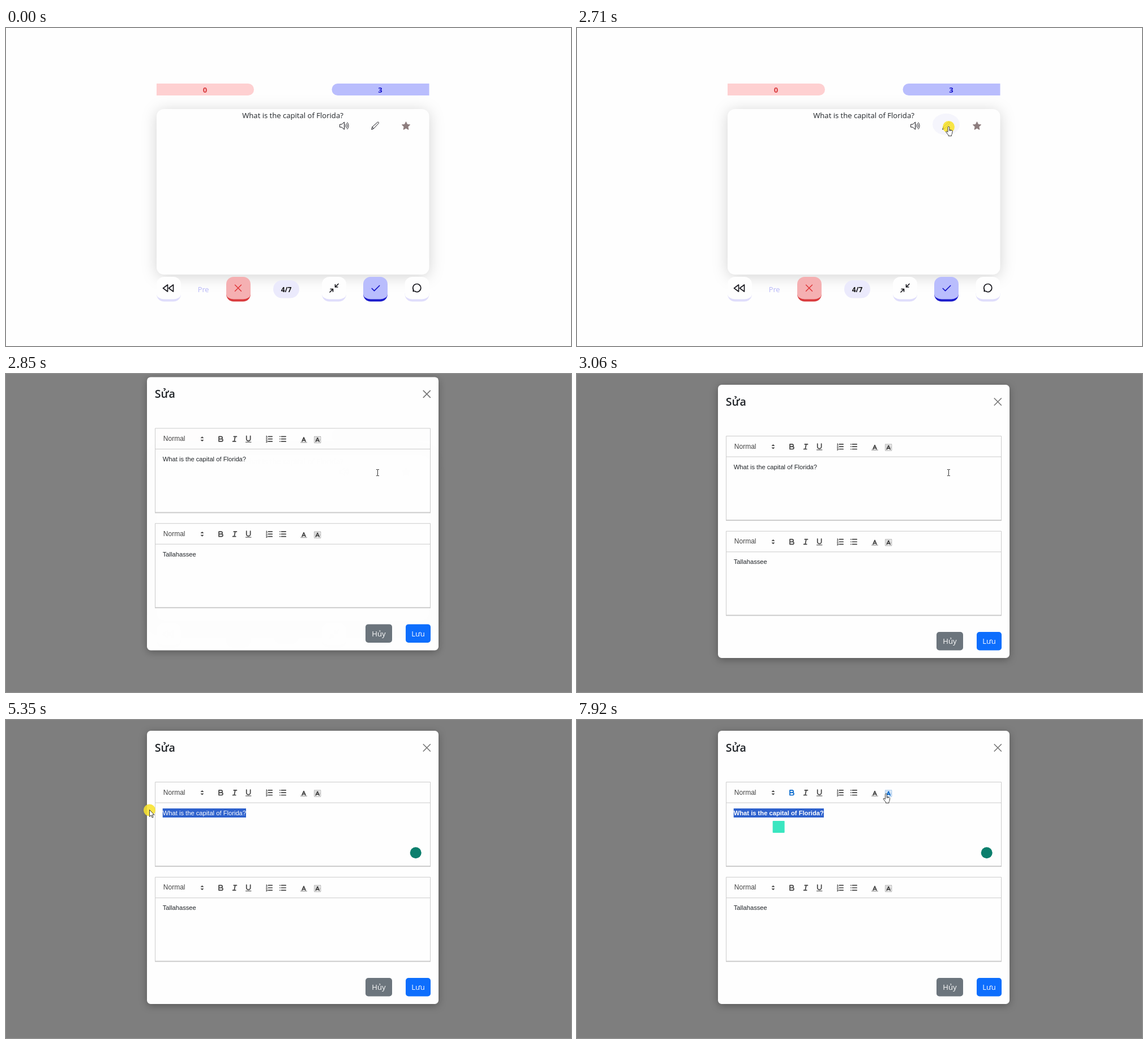
Animation of 998x561 px, one loop 7.99 s. Source, as an HTML page:

```html
<!DOCTYPE html>
<html lang="vi">
<head>
<meta charset="utf-8">
<title>Flashcard editor</title>
<style>
  html, body { margin: 0; width: 100%; height: 100%; overflow: hidden; background: #fefefe; }
  #stage { display: block; width: 998px; height: 561px; }
  text { font-family: "Open Sans", "Noto Sans", sans-serif; font-size: 13.1px; fill: #212529; }
  .mid { text-anchor: middle; }
  .bold { font-weight: 700; }
  .line { fill: none; stroke: #1c1c22; stroke-width: 1.7; stroke-linecap: round; stroke-linejoin: round; }
  .card { fill: #fefefe; filter: drop-shadow(0 3px 13px rgba(0, 0, 0, .17)); }
  .sheet { fill: #fefefe; filter: drop-shadow(0 3px 7px rgba(0, 0, 0, .3)); }
  .frame { fill: none; stroke: #ccc; }
  .editor text { font-family: "Liberation Sans", Arial, sans-serif; font-size: 11.2px; }
  .editor .pick { font-size: 12px; fill: #444; }
  .tool { color: #444; fill: none; stroke: currentColor; stroke-width: 2; stroke-linecap: round; stroke-linejoin: round; }
  .tool .solid { fill: currentColor; stroke: none; }
  .pointer { fill: #fff; stroke: #222; stroke-width: .9; stroke-linejoin: round; }
</style>
</head>
<body>
<svg id="stage" viewBox="0 0 998 561" xmlns="http://www.w3.org/2000/svg">
  <rect width="998" height="561" fill="#fefefe"/>

  <g id="page">
    <path d="M266 98h161.500a10.500 10.500 0 0 1 0 21H266z" fill="#fed0d1"/>
    <path d="M747.500 98H586a10.500 10.500 0 0 0 0 21h161.500z" fill="#b9bdfd"/>
    <text class="mid bold" x="351.500" y="114" style="fill:#d93a3d">0</text>
    <text class="mid bold" x="661" y="114" style="fill:#1414c8">3</text>

    <rect class="card" x="266" y="143" width="481.500" height="292" rx="13"/>
    <ellipse id="halo" cx="652" cy="170" rx="24" ry="19" fill="#f5f5fc"/>
    <text class="mid" x="506.500" y="158.700">What is the capital of Florida?</text>

    <g class="line" style="stroke-width:1">
      <path d="M590 170h3l4.500-4v13l-4.500-4h-3zM599.500 170.500q1.400 2 0 4M601.200 168.500q3 4 0 8M603 166.700q4.400 5.800 0 11.600"/>
      <path d="M645.800 178.700l1.200-4.200 9.300-8.300q1-.7 1.800.2.800.9 0 1.800l-8.700 9.200zM647 174.500l2.400 2.900"/>
    </g>
    <path d="M706.500 165.500l2.100 4.600 5 .6-3.700 3.500 1 5-4.400-2.500-4.400 2.500 1-5-3.700-3.500 5-.6z" fill="#8d7d7e" stroke="#8d7d7e" stroke-linejoin="round"/>

    <g id="keys"></g>
    <text x="338.700" y="466" style="fill:#b7b7f8;font-size:12.800px">Pre</text>
    <rect x="472" y="445" width="46" height="31.500" rx="15.700" fill="#ebeafc"/>
    <text class="mid bold" x="495" y="465.500" style="fill:#111;font-size:12px">4/7</text>
    <g class="line">
      <path d="M285.500 453v12l-8-6zM295.500 453v12l-8-6z"/>
      <path d="M404.500 453.300l11 11m0-11l-11 11" style="stroke:#df3336;stroke-width:1.400"/>
      <path d="M587 451.500l-5.500 5.500m0-4.300v4.300h4.300M572 466l5.500-5.500m-4.300 0h4.300v4.300"/>
      <path d="M646.300 459.500l4.200 4.200 9.200-9.200" style="stroke:#1515c8"/>
      <path d="M720.300 463a7 7 0 1 1 3.200 2.200M719.300 460v4.500h4.200"/>
    </g>
  </g>

  <rect id="shade" width="998" height="561" fill="#000"/>

  <g id="modal">
    <rect class="sheet" x="249" y="19" width="515" height="482" rx="6.500"/>
    <text x="262.800" y="56" style="font-size:19.600px;font-weight:600">Sửa</text>
    <path class="line" d="M737.300 43l12 12m0-12l-12 12" style="stroke:#777"/>
    <g id="editors"></g>
    <rect x="635" y="455" width="47" height="32.500" rx="5" fill="#6c757d"/>
    <rect x="706" y="455" width="44" height="32.500" rx="5" fill="#0d6efd"/>
    <text class="mid" x="658.500" y="476.300" style="fill:#fff">Hủy</text>
    <text class="mid" x="728" y="476.300" style="fill:#fff">Lưu</text>
  </g>

  <circle id="badge" cx="723.700" cy="234.300" r="10" fill="#0b7f6d"/>
  <rect id="helper" y="178" width="21" height="21" rx="1" fill="#3ae6c0"/>

  <circle id="press" r="10.500" fill="#f8e32c" fill-opacity=".88"/>
  <g id="pointer">
    <path id="arrow" class="pointer" d="M0 0v12l2.800-2.500 1.900 4.200 1.900-.8-1.900-4.100h3.700z"/>
    <path id="hand" class="pointer" d="M-1.500 8.500V1.300a1.400 1.400 0 0 1 2.800 0V5.500l4.200 1q1.400.5 1.200 2.100l-.7 3.900q-.2 1.200-1 2v1.900H-.5v-1.600l-4-4.900q-.7-1.400.5-1.700 1-.2 2.500 1.600zM1.300 5.500v2.300M3.400 6v2"/>
    <path id="beam" d="M-2.500-5.500h2l.5.500.5-.5h2M0-5v10M-2.500 5.500h2L0 5l.5.500h2" fill="none" stroke="#333"/>
  </g>
</svg>

<script>
const LOOP = 7990, STEP = 1000 / 15, LAG = 22;
const QUESTION = 'What is the capital of Florida?';
const TEXT_X = 276.7, TEXT_END = 424, BOLD_END = 436;
const MODAL_AT = 2695, BOLD_AT = 6365;
const $ = id => document.getElementById(id);
const show = (id, on) => $(id).setAttribute('visibility', on ? 'visible' : 'hidden');

// Rounded keys with a crescent edge below
function key(x, fill, edge) {
  return `<path fill="${edge}" d="M${x} 468v1.500a13 13 0 0 0 13 13h17a13 13 0 0 0 13-13v-1.500z"/>
    <path fill="${fill}" d="M${x} 452a13 13 0 0 1 13-13h17a13 13 0 0 1 13 13v17.500a13 9 0 0 1-13 9h-17a13 9 0 0 1-13-9z"/>`;
}
$('keys').innerHTML = [
  [266, '#fefefe', '#dfddfb'], [389, '#f5b0b2', '#d93a3d'], [558, '#fefefe', '#dfddfb'],
  [631, '#b9bdfd', '#1a1acb'], [704.5, '#fefefe', '#dfddfb']
].map(k => key(...k)).join('');

// Toolbar icons on an 18 unit grid: name, centre x, centre y, drawing
const LETTER = '<path d="M5.500 13L9 5l3.500 8M6.400 11h5.200"/>';
const TOOLS = [
  ['pick', 346.5, 128.2, '<path class="solid" d="M5.500 7.500L9 4l3.500 3.500zM5.500 10.500L9 14l3.500-3.500z"/>'],
  ['bold', 379.5, 128.2, '<path d="M5 4h4.500a2.500 2.500 0 0 1 0 5H5zM5 9h5.500a2.500 2.500 0 0 1 0 5H5z"/>'],
  ['italic', 404, 128.2, '<path d="M7 4h6M5 14h6M8 14L10 4"/>'],
  ['under', 428.2, 128.2, '<path d="M5 3v6a4 4 0 0 0 8 0V3"/><rect class="solid" x="3" y="15" width="12" height="1.200"/>'],
  ['ordered', 465, 128.2, '<path d="M7 4h8M7 9h8M7 14h8"/><path stroke-width="1" d="M2.500 5.500h2.500M3.800 5.500v-3l-1 .5M2.500 7.800h2l-2 2.700h2.500M2.500 12.500h2v3.500h-2M3 14.200h1.500"/>'],
  ['bullet', 489, 128.2, '<path d="M6 4h9M6 9h9M6 14h9M3 4h0M3 9h0M3 14h0"/>'],
  ['color', 526, 129, LETTER + '<path opacity=".4" d="M3 15h12"/>'],
  ['back', 550.2, 129.5, LETTER + '<path stroke-width="1" stroke-linecap="butt" stroke-dasharray="1 1" d="M2.500 2.500h13v13h-13zM4.500 4.500h2.500M4.500 6.500h2M11.500 4.500h2M12 6.500h2M4.500 8.500h1M13 8.500h1M4.500 10.500h1M13 10.500h1"/>']
];

function editor(id, dy, text) {
  const icons = TOOLS.map(([name, x, y, art]) =>
    `<g id="${id}-${name}" class="tool" transform="translate(${x - 7.74} ${y - 7.74}) scale(.86)">${art}</g>`).join('');
  return `<g class="editor" transform="translate(0 ${dy})">
    <path class="frame" d="M263.500 258V109.500h486V258M263.500 146h486"/>
    <path class="frame" stroke-width="2" d="M263 258h487"/>
    <text class="pick" x="277.800" y="131.500">Normal</text>${icons}
    <text id="${id}-text" x="${TEXT_X}" y="167.600">${text}</text></g>`;
}
$('editors').innerHTML = editor('front', 0, QUESTION) + `
  <clipPath id="cut"><rect id="cutBox" y="156" height="16"/></clipPath>
  <g class="editor" clip-path="url(#cut)"><rect x="270" y="156" width="180" height="16" fill="#2f62cd"/>
  <text id="picked" x="${TEXT_X}" y="167.600" style="fill:#fff">${QUESTION}</text></g>` +
  editor('back', 167.8, 'Tallahassee');

const fades = [
  $('modal').animate([{ opacity: 0 }, { opacity: 1 }], { duration: 150, delay: MODAL_AT, fill: 'both' }),
  $('modal').animate([{ transform: 'translateY(-43px)' }, { transform: 'none' }],
    { duration: 300, delay: MODAL_AT, easing: 'ease-out', fill: 'both' }),
  $('shade').animate([{ opacity: 0 }, { opacity: .5 }], { duration: 150, delay: MODAL_AT, fill: 'both' })
];
fades.forEach(a => a.pause());

// Pointer path: time, x, y
const PATH = [
  [120, 959, 549], [383, 959, 549], [650, 800, 452], [920, 599.5, 336.5],
  [993, 599.5, 336.5], [1220, 636, 308], [1450, 676, 230], [1600, 668, 178], [1720, 656.5, 174],
  [3263, 656.5, 174], [3660, 613, 187], [3733, 613, 187], [4010, 657, 242], [4190, 610, 266], [4490, 421.5, 169.5],
  [4630, 421.5, 169.5], [5150, 253.5, 158.5], [5413, 253.5, 158.5], [5750, 305, 165], [6100, 378, 127],
  [6893, 378, 127], [7200, 415, 202], [7450, 480, 186], [7710, 536, 136], [7725, 536, 136], [7920, 546, 130]
];
const PRESSES = [[2575, 2695], [4620, 5475], [6225, 6365]];

function slope(i, k) {
  const a = PATH[i - 1], b = PATH[i], c = PATH[i + 1];
  const still = !a || !c || (a[1] === b[1] && a[2] === b[2]) || (b[1] === c[1] && b[2] === c[2]);
  return still ? 0 : (c[k] - a[k]) / (c[0] - a[0]);
}

function pointAt(t) {
  const n = PATH.findIndex(p => p[0] > t);
  if (n === 0) return PATH[0].slice(1);
  if (n < 0) return PATH[PATH.length - 1].slice(1);
  const a = PATH[n - 1], b = PATH[n], d = b[0] - a[0], s = (t - a[0]) / d, r = 1 - s;
  return [1, 2].map(k => r * r * (1 + 2 * s) * a[k] + s * s * (3 - 2 * s) * b[k]
    + d * s * r * (r * slope(n - 1, k) - s * slope(n, k)));
}

function draw(now) {
  const t = Math.max(0, Math.floor((now + LAG) / STEP) * STEP - LAG);
  fades.forEach(a => { a.currentTime = t; });

  const [x, y] = pointAt(t);
  const open = t > MODAL_AT, bold = t >= BOLD_AT;
  const overPencil = !open && Math.hypot((x - 652) / 24, (y - 170) / 19) < 1;
  const tool = open && y > 117 && y < 140 ? TOOLS.find(k => Math.abs(x - k[1]) < 12) : null;
  const overText = open && x > 264 && x < 749 && y > 146 && y < 258;
  const kind = overPencil || tool ? 'hand' : overText ? 'beam' : 'arrow';

  const visible = now >= 120;
  for (const id of ['arrow', 'hand', 'beam']) show(id, visible && id === kind);
  $('pointer').setAttribute('transform', `translate(${x} ${y})`);
  show('halo', overPencil);

  const down = PRESSES.some(([a, b]) => t >= a && t < b);
  show('press', down);
  $('press').setAttribute('cx', x);
  $('press').setAttribute('cy', y + .5);

  for (const k of TOOLS) {
    const lit = k === tool || (bold && k[0] === 'bold');
    $('front-' + k[0]).style.color = lit ? '#06c' : '#444';
  }

  const end = bold ? BOLD_END : TEXT_END;
  const left = t < 4625 ? end : t > 5150 ? TEXT_X : Math.max(TEXT_X, Math.min(end, x));
  $('cutBox').setAttribute('x', left);
  $('cutBox').setAttribute('width', end - left);
  for (const id of ['front-text', 'picked']) $(id).style.fontWeight = bold ? 700 : 400;

  show('badge', t >= 4760);
  show('helper', t >= 5540);
  $('helper').setAttribute('x', (TEXT_X + end) / 2 - 10.7);
}

const begin = performance.now();
function tick() {
  draw((performance.now() - begin) % LOOP);
  requestAnimationFrame(tick);
}
tick();
</script>
</body>
</html>
```
